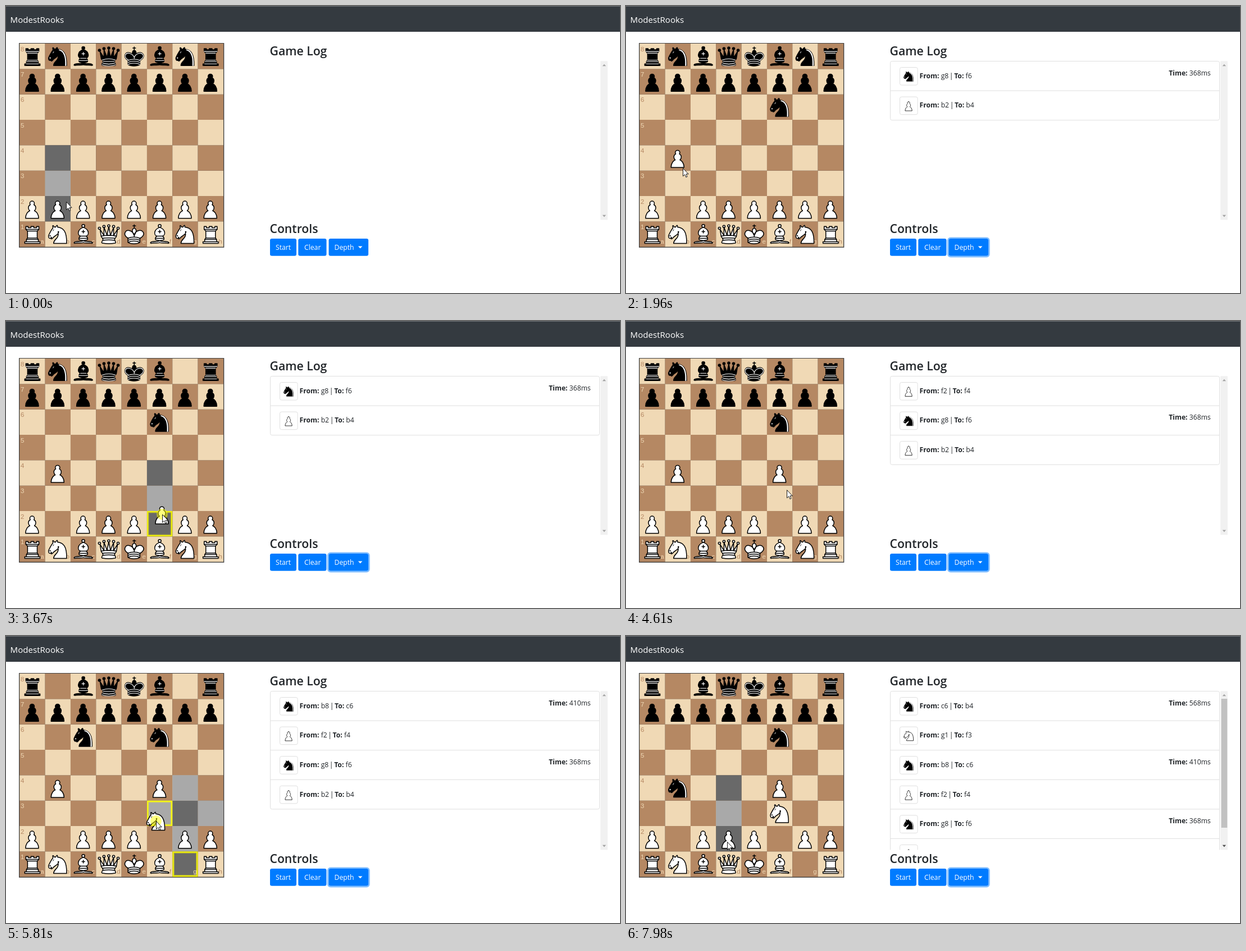
These frames come from a looping animation (1093 by 512 pixels, 8000 ms). An HTML page:

```html
<!DOCTYPE html>
<html lang="en">
<head>
<meta charset="utf-8">
<title>Chess game</title>
<style>
html, body { margin: 0; width: 100%; height: 100%; overflow: hidden; background: #fff; }
svg { display: block; width: 100%; height: 100%; }
text { font: 12.2px "Open Sans", "Noto Sans", sans-serif; fill: #212529; }
.b { font-weight: 700; }
.head { font-size: 21.2px; font-weight: 600; }
.light { fill: #fff; }
.coord { font: 11.5px "Liberation Sans", Arial, sans-serif; }
.line { fill: none; stroke: #dfdfdf; }
.ink { stroke: #000; stroke-width: 1.5; stroke-linecap: round; stroke-linejoin: round; }
</style>
</head>
<body>
<svg viewBox="0 0 1093 512">
  <defs id="defs"><clipPath id="logClip"><rect x="469" y="98" width="589" height="283.5"/></clipPath></defs>
  <rect width="1093" height="512" fill="#fff"/>
  <rect width="1093" height="46" fill="#343a40"/>
  <rect width="1093" height="1" fill="#6f7478"/>
  <text class="light" x="7.5" y="29.8" style="font-size:15.1px">ModestRooks</text>

  <rect x="23" y="66" width="365.3" height="365" fill="#404040"/>
  <g id="squares"></g>
  <g id="marks"></g>
  <g id="coords"></g>
  <g id="pieces"></g>

  <text class="head" x="469.5" y="88">Game Log</text>
  <g clip-path="url(#logClip)" id="log"></g>
  <rect x="1058.2" y="98.3" width="12.8" height="283.2" fill="#f1f1f1"/>
  <rect id="thumb" x="1059.7" y="112" width="10.6" height="230" fill="#c1c1c1"/>
  <path d="M1061.7 107.3h6.4l-3.2-3.6z" fill="#a3a3a3"/>
  <path id="down" d="M1061.7 372.8h6.4l-3.2 3.6z"/>

  <text class="head" x="469.5" y="404.5">Controls</text>
  <rect id="focus" x="573.2" y="413.7" width="73.2" height="33.4" rx="4.6" fill="none" stroke="#80bdff" stroke-width="2.6"/>
  <g fill="#007bff">
    <rect x="470" y="415" width="47" height="30.8" rx="3.3"/>
    <rect x="520.3" y="415" width="50.2" height="30.8" rx="3.3"/>
    <rect x="574.5" y="415" width="70.6" height="30.8" rx="3.3"/>
  </g>
  <text class="light" x="480" y="435">Start</text>
  <text class="light" x="531" y="435">Clear</text>
  <text class="light" x="584.5" y="435">Depth</text>
  <path d="M626.8 428.6h7.6l-3.8 3.9z" fill="#fff"/>

  <g id="drag"></g>
  <g id="pointer">
    <circle id="press" r="10" fill="#ff0" fill-opacity=".5"/>
    <path d="M.5 .5V14.6L3.7 11.6 5.8 16.4 8 15.5 6 10.8H10.2Z" fill="#fff" stroke="#000" stroke-width=".9"/>
  </g>
</svg>
<script>
const LOOP = 8000, SIZE = 45.33, LEFT = 24.3, TOP = 67, ROW = 52.6;
const $ = id => document.getElementById(id);

// Piece outlines on a 45-unit square; "lines" are drawn in the contrasting colour.
const crownBands = 'M11.5 30C17 27 27 27 32.5 30M11.5 33.5C17 30.5 27 30.5 32.5 33.5M11.5 37C17 34 27 34 32.5 37';
const dot = (x, y, r) => `M${x - r} ${y}a${r} ${r} 0 1 1 ${2 * r} 0a${r} ${r} 0 1 1 ${-2 * r} 0z`;
const shapes = {
  p: { body: 'M22 9C19.8 9 18 10.8 18 13C18 13.9 18.3 14.7 18.8 15.4C16.8 16.5 15.5 18.6 15.5 21C15.5 23 16.4 24.8 17.9 26C14.9 27.1 10.5 31.6 10.5 39.5H33.5C33.5 31.6 29.1 27.1 26.1 26C27.6 24.8 28.5 23 28.5 21C28.5 18.6 27.2 16.5 25.2 15.4C25.7 14.7 26 13.9 26 13C26 10.8 24.2 9 22 9z' },
  r: { body: 'M9 39V36H12V32L14 29.5V17L11 14V9H15V11H20V9H25V11H30V9H34V14L31 17V29.5L33 32V36H36V39z',
       lines: 'M12 36H33M12.5 32H32.5M14 29.5H31M14 17H31M11 14H34' },
  n: { body: 'M22 10C32.5 11 38.5 18 38 39H15C15 30 25 32.5 23 18L24 18C24.4 20.9 18.5 25.4 16 27C13 29 13.2 31.3 11 31C10 30 12.4 28 11 28C10 28 11.2 29.2 10 30C9 30 6 31 6 26C6 24 12 14 12 14C12 14 13.9 12.1 14 10.5C13.3 9.5 13.5 8.5 13.5 7.5C14.5 6.5 16.5 10 16.5 10H18.5C18.5 10 19.3 8 21 7C22 7 22 10 22 10z',
       eyes: dot(9, 25.5, .7) + 'M15.2 14.4L14 16.7',
       shine: 'M24.6 10.4L24.1 11.9L24.6 12C27.8 13 30.3 14.5 32.5 18.8C34.8 23 35.8 29 35.3 39L35.2 39.5H37.5V39C38 29 36.6 22.2 34.3 17.7C31.9 13.2 28.5 11 25 10.5z' },
  b: { body: 'M9 36C12.4 35 19.1 36.4 22.5 34C25.9 36.4 32.6 35 36 36C36 36 37.7 36.5 39 38C38.3 39 37.4 39 36 38.5C32.6 37.5 25.9 39 22.5 37.5C19.1 39 12.4 37.5 9 38.5C7.6 39 6.7 39 6 38C7.4 36 9 36 9 36zM15 32C17.5 34.5 27.5 34.5 30 32C30.5 30.5 30 30 30 30C30 27.5 27.5 26 27.5 26C33 24.5 33.5 14.5 22.5 10.5C11.5 14.5 12 24.5 17.5 26C17.5 26 15 27.5 15 30C15 30 14.5 30.5 15 32z' + dot(22.5, 8, 2.5),
       lines: 'M17.5 26H27.5M15 30H30M22.5 15.5V20.5M20 18H25' },
  q: { body: 'M9 26C17.5 24.5 30 24.5 36 26L38 14L31 25V11L25.5 24.5L22.5 9.5L19.5 24.5L14 10.5V25L7 14zM9 26C9 28 10.5 28 11.5 30C12.5 31.5 12.5 31 12 33.5C10.5 34.5 10.5 36 10.5 36C9 37.5 11 38.5 11 38.5C17.5 39.5 27.5 39.5 34 38.5C34 38.5 35.5 37.5 34 36C34 36 34.5 34.5 33 33.5C32.5 31 32.5 31.5 33.5 30C34.5 28 36 28 36 26C27.5 24.5 17.5 24.5 9 26z' + [[6, 12], [14, 9], [22.5, 8], [31, 9], [39, 12]].map(([x, y]) => dot(x, y, 2)).join(''),
       lines: 'M11.5 30C15 29 30 29 33.5 30M12 33.5C18 32.5 27 32.5 33 33.5',
       darkLines: 'M11 29A35 35 0 0 1 34 29M12.5 31.5H32.5M11.5 34.5A35 35 0 0 0 33.5 34.5M10.5 37.5A35 35 0 0 0 34.5 37.5' },
  k: { body: 'M22.5 11.6V6M20 8H25M22.5 25C22.5 25 27 17.5 25.5 14.5C25.5 14.5 24.5 12 22.5 12C20.5 12 19.5 14.5 19.5 14.5C18 17.5 22.5 25 22.5 25M11.5 37C17 40.5 27 40.5 32.5 37V30C32.5 30 41.5 25.5 38.5 19.5C34.5 13 25 16 22.5 23.5V27V23.5C19 16 9.5 13 6.5 19.5C3.5 25.5 11.5 29.5 11.5 29.5z',
       lines: crownBands,
       darkLines: crownBands + 'M32 29.5C32 29.5 40.5 25.5 38 19.9C34.2 14 25 18 22.5 24.5V26.6V24.5C20 18 9.9 14 7 19.9C4.5 25.5 11.9 28.9 11.9 28.9' }
};

function pieceSymbol(side, kind) {
  const { body, lines = '', darkLines, eyes = '', shine } = shapes[kind];
  const white = side === 'w', ink = white ? '#000' : '#fff';
  const detail = white ? lines : darkLines || lines;
  return `<g id="${side + kind}" class="ink"><path d="${body}" fill="${white ? '#fff' : '#000'}"/>` +
    `<path d="${detail}" fill="none" style="stroke:${ink};stroke-width:${white ? 1.5 : 1.1}"/>` +
    `<path d="${eyes}" fill="${ink}" style="stroke:${ink};stroke-width:.9"/>` +
    (shine && !white ? `<path d="${shine}" fill="#fff" stroke="none"/>` : '') + '</g>';
}

const files = 'abcdefgh';
const corner = sq => [LEFT + files.indexOf(sq[0]) * SIZE, TOP + (8 - sq[1]) * SIZE];
const isDark = sq => (files.indexOf(sq[0]) + 1 + +sq[1]) % 2 === 0;
const squareAt = (x, y) => files[Math.floor((x - LEFT) / SIZE)] + (8 - Math.floor((y - TOP) / SIZE));
const cell = (sq, fill) => {
  const [x, y] = corner(sq);
  return `<rect x="${x}" y="${y}" width="${SIZE}" height="${SIZE}" fill="${fill}"/>`;
};
const ring = sq => {
  const [x, y] = corner(sq);
  const frame = (d, w, o) => `<rect x="${x + d}" y="${y + d}" width="${SIZE - 2 * d}" height="${SIZE - 2 * d}" fill="none" stroke="#ff0" stroke-width="${w}" stroke-opacity="${o}"/>`;
  return frame(1.3, 2.5, .9) + frame(3.1, 1.2, .35);
};
const piece = (id, x, y, scale = SIZE / 45) =>
  `<use href="#${id}" transform="translate(${x} ${y}) scale(${scale})"/>`;

// [time, square, piece placed there or '' when emptied]
const changes = [
  [580, 'b2', ''], [1420, 'b4', 'wp'], [1960, 'f6', 'bn'], [2010, 'g8', ''],
  [3440, 'f2', ''], [4000, 'f4', 'wp'], [4660, 'c6', 'bn'], [4710, 'b8', ''],
  [5430, 'g1', ''], [5900, 'f3', 'wn'], [6780, 'b4', 'bn'], [6830, 'c6', '']
];
// [press, release, square, piece]
const drags = [[580, 1420, 'b2', 'wp'], [3440, 4000, 'f2', 'wp'], [5430, 5900, 'g1', 'wn']];
// [start, end, greyed squares]
const hints = [
  [0, 1420, 'b2 b3 b4'], [2500, 2729, 'd2 d3 d4'], [2729, 2990, 'e2 e3 e4'],
  [2990, 4000, 'f2 f3 f4'], [4900, 5900, 'g2 g3 g4'], [5192, 5900, 'g1 f3 h3'],
  [7000, 7930, 'e2 e3 e4'], [7930, LOOP, 'd2 d3 d4']
];
// [time, piece, from, to, thinking time]
const moves = [
  [1470, 'wp', 'b2', 'b4'], [1960, 'bn', 'g8', 'f6', 368], [4130, 'wp', 'f2', 'f4'],
  [4660, 'bn', 'b8', 'c6', 410], [5980, 'wn', 'g1', 'f3'], [6600, 'bn', 'c6', 'b4', 568]
];
// [time, x, y]
const path = [
  [0, 107, 349], [30, 106, 349], [120, 103, 350], [270, 103, 350], [430, 101, 352], [580, 101, 352],
  [1270, 101, 289], [2000, 101, 289], [2350, 140, 322], [2600, 178, 350], [2750, 210, 362],
  [2800, 214, 362], [3130, 277, 357], [3660, 277, 357], [3670, 278, 345], [3950, 283, 284],
  [4600, 284, 284], [4610, 286, 301], [5000, 306, 352], [5300, 316, 402], [5430, 316, 402],
  [5690, 255, 346], [5810, 267, 330], [5900, 267, 326], [6490, 267, 330], [6730, 265, 351],
  [6900, 258, 374], [7000, 250, 379], [7290, 221, 367], [7340, 220, 367], [7420, 212, 367],
  [7920, 212, 367], [7930, 196, 367], [7980, 180, 367], [LOOP, 180, 367]
];

function pointerAt(t) {
  const i = path.findIndex(p => p[0] > t);
  const [t0, x0, y0] = path[i - 1], [t1, x1, y1] = path[i];
  const k = (t - t0) / (t1 - t0);
  return [x0 + (x1 - x0) * k, y0 + (y1 - y0) * k];
}

function boardAt(t) {
  const board = {};
  [...files].forEach((f, i) => {
    const kind = 'rnbqkbnr'[i];
    Object.assign(board, { [f + 8]: 'b' + kind, [f + 7]: 'bp', [f + 2]: 'wp', [f + 1]: 'w' + kind });
  });
  for (const [at, sq, id] of changes) if (t >= at) board[sq] = id;
  return Object.entries(board).filter(([, id]) => id)
    .map(([sq, id]) => piece(id, ...corner(sq))).join('');
}

function logAt(t) {
  const list = moves.filter(m => t >= m[0]).reverse();
  if (!list.length) return '';
  const rows = list.map(([, id, from, to, ms], i) => {
    const y = 98.5 + i * ROW;
    return (i ? `<path class="line" d="M470.5 ${y}H1056.5"/>` : '') +
      `<rect class="line" x="487.5" y="${y + 11}" width="31.6" height="31.6" rx="3"/>` +
      piece(id, 491.3, y + 14.8, .535) +
      `<text x="522.5" y="${y + 30.3}"><tspan class="b">From:</tspan> ${from} <tspan dx="-1.6">|</tspan><tspan dx="-1.6"> </tspan><tspan class="b">To:</tspan> ${to}</text>` +
      (ms ? `<text x="1040.8" y="${y + 25.2}" text-anchor="end"><tspan class="b">Time:</tspan> ${ms}ms</text>` : '');
  });
  return `<rect class="line" x="470.5" y="98.5" width="586" height="${list.length * ROW}" rx="3"/>` + rows.join('');
}

const cache = {};
function fill(id, html) {
  if (cache[id] !== html) $(id).innerHTML = cache[id] = html;
}
const show = (id, on) => $(id).setAttribute('visibility', on ? 'visible' : 'hidden');

function render(t) {
  const [x, y] = pointerAt(t);
  const drag = drags.find(([a, b]) => t >= a && t < b);
  const grey = hints.filter(([a, b]) => t >= a && t < b).flatMap(h => h[2].split(' '));
  const rings = drag ? [...new Set([drag[2], squareAt(x, y)])] : [];
  fill('marks', grey.map(sq => cell(sq, isDark(sq) ? '#696969' : '#a9a9a9')).join('') + rings.map(ring).join(''));
  fill('pieces', boardAt(t));
  fill('log', logAt(t));
  fill('drag', drag ? piece(drag[3], x - SIZE / 2, y - SIZE / 2) : '');
  show('press', drag);
  show('focus', t >= 580);
  const overflow = t >= moves[5][0];
  show('thumb', overflow);
  $('down').setAttribute('fill', overflow ? '#505050' : '#a3a3a3');
  $('pointer').setAttribute('transform', `translate(${x} ${y})`);
}

function buildBoard() {
  const names = [...files].flatMap(f => [1, 2, 3, 4, 5, 6, 7, 8].map(r => f + r));
  const tone = dark => dark ? '#b58863' : '#f0d9b5';
  const label = (sq, text, dx, dy, anchor) => {
    const [x, y] = corner(sq);
    return `<text class="coord" x="${x + dx}" y="${y + dy}" text-anchor="${anchor}" style="fill:${tone(!isDark(sq))}">${text}</text>`;
  };
  $('defs').insertAdjacentHTML('beforeend',
    ['w', 'b'].flatMap(side => Object.keys(shapes).map(kind => pieceSymbol(side, kind))).join(''));
  fill('squares', names.map(sq => cell(sq, tone(isDark(sq)))).join(''));
  fill('coords', names.map(sq =>
    (sq[0] === 'a' ? label(sq, sq[1], 1.7, 13.7, 'start') : '') +
    (sq[1] === '1' ? label(sq, sq[0], SIZE - 2, SIZE - 5.6, 'end') : '')).join(''));
}

function tick() {
  render(performance.now() % LOOP);
  requestAnimationFrame(tick);
}
buildBoard();
tick();
</script>
</body>
</html>
```
